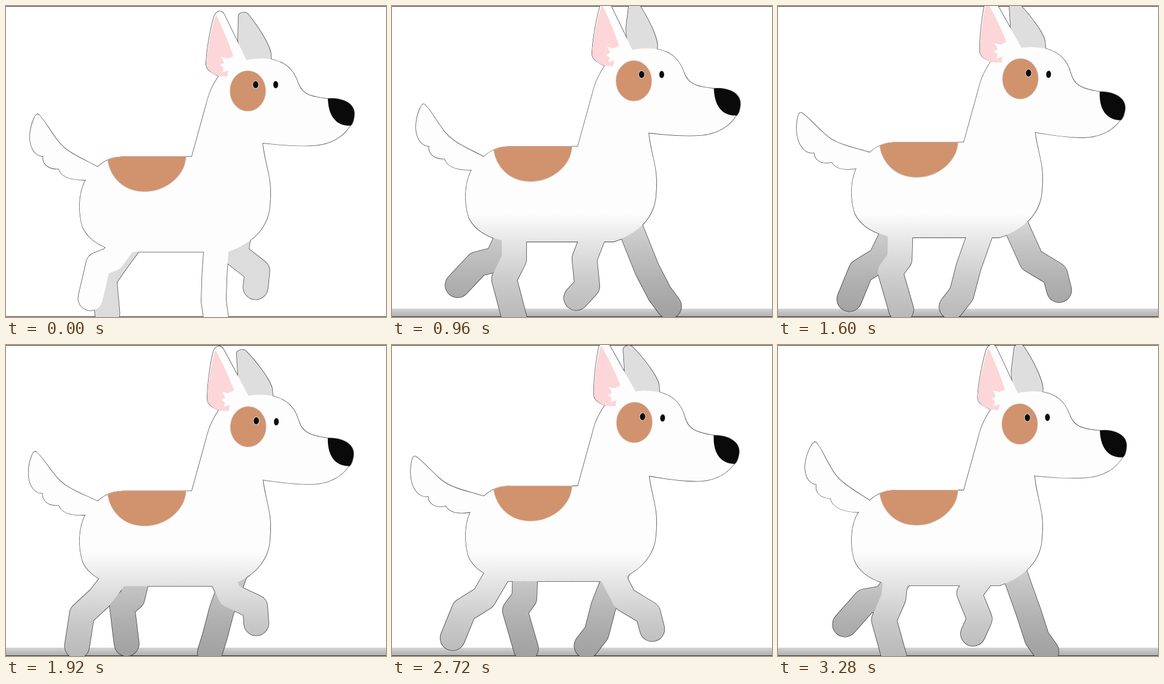
An HTML page with a canvas for the animation above (3360 ms loop, 634 by 520 pixels).

```html
<!DOCTYPE html>
<html lang="en">
<head>
<meta charset="utf-8">
<title>Walking dog</title>
<style>
  html, body { margin: 0; width: 100%; height: 100%; overflow: hidden; background: #fff; }
  canvas { display: block; width: 634px; height: 520px; }
</style>
</head>
<body>
<canvas id="stage" width="634" height="520"></canvas>
<script>
const W = 634, H = 520, STEP = 80, FRAMES = 42;
const STRIDE = 28 / 3; // steps in one full stride
const WHITE = '#fdfdfd', GREY = '#dcdcdc', BROWN = '#d0936e', RIM = '#dcc2b3', LINE = '#505050';
const ctx = document.getElementById('stage').getContext('2d');

// Mean plus cosine and sine pairs of rising harmonics; p counts turns
function wave(p, mean, ...terms) {
  return terms.reduce((sum, k, i) => {
    const a = 2 * Math.PI * p * (1 + (i >> 1));
    return sum + k * (i % 2 ? Math.sin(a) : Math.cos(a));
  }, mean);
}

// Quick rise, slow even fall
function hop(u) {
  const t = u / .286;
  return t < 1 ? t * t * (3 - 2 * t) : (1 - u) / .714;
}

// End of a limb that hangs at an angle in degrees, forward positive
function reach([x, y], angle, length) {
  const a = angle * Math.PI / 180;
  return [x + Math.sin(a) * length, y + Math.cos(a) * length];
}

function foreLeg(p, bob) {
  const shoulder = [wave(p, 352, 0, -12), 390 + bob];
  const knee = [wave(p, 352, 0, -41, -4, 0, 0, -7), wave(p, 431, 16, -5)];
  const ankle = reach(knee, wave(p, 21, -27, -22, 4, 2, 0, -6), 46);
  const foot = reach(ankle, wave(p, -3, 7, -39, 4, -8), 27);
  return [shoulder, knee, ankle, foot];
}

function hindLeg(p, bob) {
  const hip = [wave(p, 190, 4, 15), 400 + bob];
  const knee = [wave(p, 177, 4, 27, -4, 0, 0, 3), 423];
  const hock = [wave(p, 153, 4, 37, -3, 0, 0, 5), wave(p, 444, -12, 10)];
  const foot = reach(hock, wave(p, -8, -9, 30, 4, 6, 0, 3), wave(p, 58, 0, 10));
  return [hip, knee, hock, foot];
}

function pose(p) {
  const half = p * 2; // trunk moves twice per stride
  const bob = wave(p, -20 * hop(half % 1), 0, -5);
  const nod = wave(half, .017, -.007, .04, -.01);
  return {
    bob, nod,
    tail: wave(half, -.03, .06, -.14, -.02, .06),
    nearEar: -1.9 * nod,
    farEar: wave(half, 0, -.025, -.142, .025),
    nearFore: foreLeg(p, bob),
    nearHind: hindLeg(p, bob),
    farFore: foreLeg(p + .5, bob).map(([x, y]) => [x + 35, y]),
    farHind: hindLeg(p + .5, bob).map(([x, y]) => [x + 18, y])
  };
}

const oval = (x, y, rx, ry) => {
  const p = new Path2D();
  p.ellipse(x, y, rx, ry, 0, 0, 7);
  return p;
};
const torso = new Path2D('M310 252H200C180 252 168 256 153 269L133 291C120 315 121 347 128 370C135 386 150 397 167 404L190 411H370C400 402 437 377 440 335C443 305 440 290 435 268C431 250 429 240 428 229L400 130L355 117C341 138 338 150 334 165Z');
const tail = new Path2D('M153 269C120 252 100 245 85 225C70 205 62 190 54 183C51 180 48 184 46 189C39 205 37 225 43 238C48 249 55 252 62 252C60 264 70 274 88 273C92 285 105 292 134 291L156 285Z');
const head = new Path2D('M398 91C415 87 430 87 442 89C468 94 480 108 487 128C494 148 508 152 537 155L574 200C562 220 540 231 515 233C485 235 455 232 428 229L362 180L355 117Z');
const nose = new Path2D('M537 155C560 153 582 162 581 182C580 192 577 199 574 200C556 201 538 190 537 155Z');
const nearEar = new Path2D('M355 117C340 110 333 105 334 95C335 70 342 35 347 18C351 7 361 6 365 16L401 90L406 102L375 120Z');
const pink = new Path2D('M351 15C346 22 335 75 334 95C334 105 342 113 355 117L369 118L371 108L361 111L363 103L357 99L364 95L359 85L369 88L379 84C375 70 365 45 351 15Z');
const farEar = new Path2D('M388 16C390 10 401 9 404 14C420 33 440 65 442 80V94L400 100C392 80 387 65 387 55Z');
const saddle = new Path2D('M170 258C176 254 185 252 200 252H300C298 285 265 311 229 310C195 309 174 285 170 258Z');
const patch = oval(403.5, 142, 29.5, 33.5);
const eyes = [oval(416.5, 131.5, 4.5, 6), oval(450, 131.5, 4, 6)];

function drawDog(now, outline) {
  const shape = (path, color, rim) => {
    ctx.strokeStyle = outline ? LINE : rim;
    ctx.lineWidth = 1.6;
    if (outline || rim) ctx.stroke(path);
    ctx.fillStyle = color;
    if (!outline) ctx.fill(path);
  };
  const leg = (joints, color) => {
    ctx.beginPath();
    joints.forEach(([x, y]) => ctx.lineTo(x, y));
    ctx.lineWidth = outline ? 42.6 : 41;
    ctx.strokeStyle = outline ? LINE : color;
    ctx.stroke();
  };
  const within = (x, y, angle, draw) => {
    ctx.save();
    ctx.translate(x, y);
    ctx.rotate(angle);
    ctx.translate(-x, -y);
    draw();
    ctx.restore();
  };
  const onBody = draw => {
    ctx.save();
    ctx.translate(0, now.bob);
    draw();
    ctx.restore();
  };
  const onHead = draw => onBody(() => within(351, 157, now.nod, draw));

  leg(now.farFore, GREY);
  leg(now.farHind, GREY);
  onHead(() => within(415, 90, now.farEar, () => shape(farEar, '#dedede')));
  onBody(() => {
    within(152, 268, now.tail, () => shape(tail, WHITE));
    shape(torso, WHITE);
  });
  leg(now.nearHind, WHITE);
  leg(now.nearFore, WHITE);
  onHead(() => {
    shape(head, WHITE);
    within(362, 105, now.nearEar, () => {
      shape(nearEar, WHITE);
      if (!outline) shape(pink, '#fcd6d8');
    });
    shape(nose, '#0a0a0a');
  });
  if (outline) return;
  onBody(() => shape(saddle, BROWN, RIM));
  onHead(() => {
    shape(patch, BROWN, RIM);
    eyes.forEach(eye => shape(eye, '#0a0a0a', '#eee'));
  });
}

function fade(top, stops) {
  const g = ctx.createLinearGradient(0, top, 0, H);
  stops.forEach(([at, alpha]) => g.addColorStop(at, `rgba(0,0,0,${alpha})`));
  ctx.fillStyle = g;
  ctx.fillRect(0, top, W, H - top);
}

function render(n) {
  const now = pose(n / STRIDE % 1);
  const shade = Math.min(1, Math.max(0, (n * STEP - 640) / 240));
  ctx.clearRect(0, 0, W, H);
  ctx.lineCap = ctx.lineJoin = 'round';
  drawDog(now, true);
  drawDog(now, false);

  // shadow falls on the dog only
  ctx.globalAlpha = shade;
  ctx.globalCompositeOperation = 'source-atop';
  fade(345, [[0, 0], [.31, .1], [.66, .2], [1, .27]]);

  // ground and border lines lie behind
  ctx.globalCompositeOperation = 'destination-over';
  ctx.globalAlpha = 1;
  ctx.fillStyle = '#333';
  ctx.fillRect(0, 0, W, 1);
  ctx.fillRect(0, H - 1, W, 1);
  ctx.globalAlpha = shade;
  fade(506, [[0, .17], [1, .32]]);
  ctx.globalAlpha = 1;
  ctx.globalCompositeOperation = 'source-over';
}

const start = performance.now();
function tick() {
  const t = Math.max(0, performance.now() - start);
  render(Math.floor(t / STEP) % FRAMES);
  requestAnimationFrame(tick);
}
tick();
</script>
</body>
</html>
```
